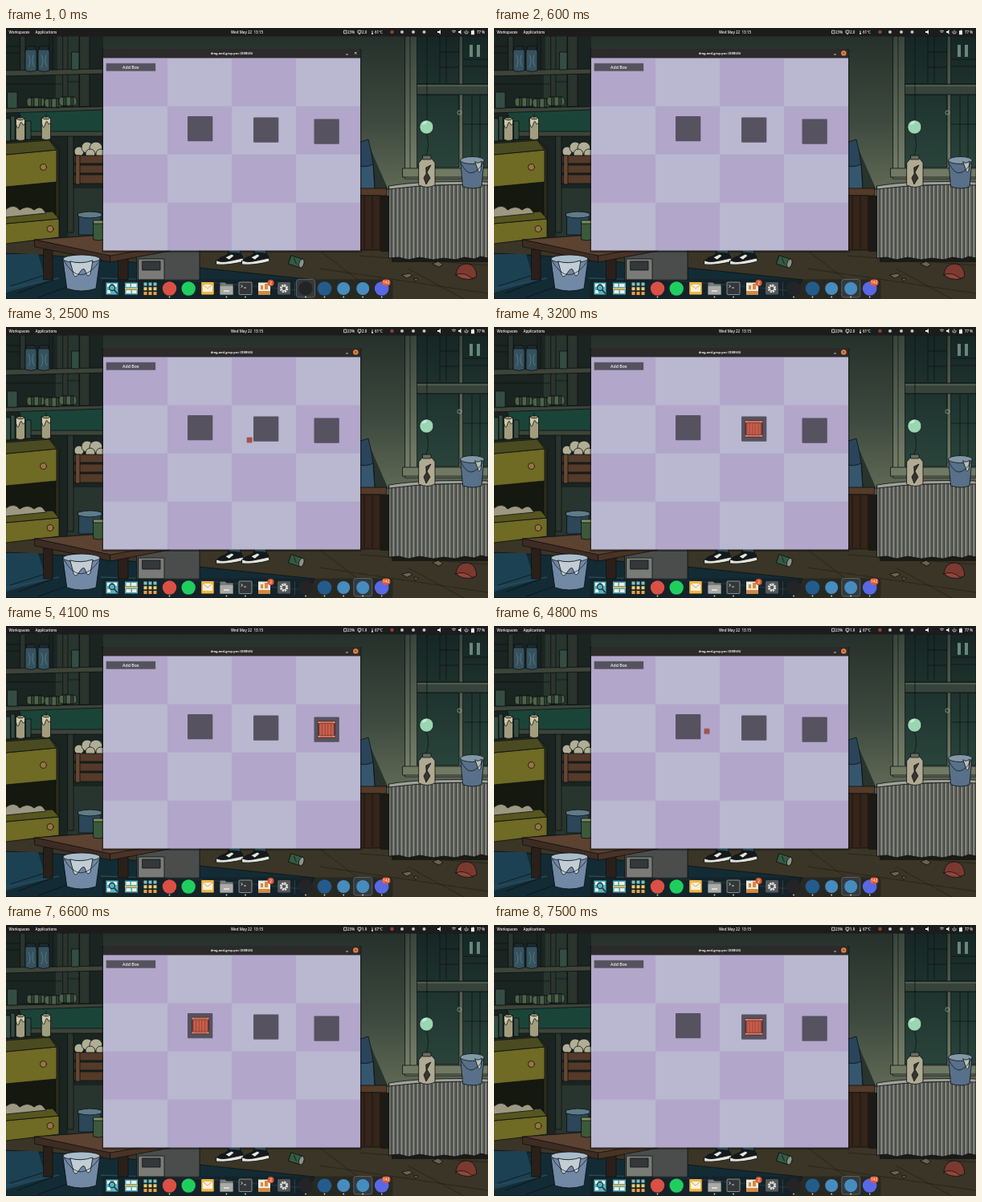
An HTML page that plays this animation: 600 by 338 pixels, repeating every 8 s.

```html
<!DOCTYPE html>
<html lang="en">
<head>
<meta charset="utf-8">
<title>Drag and drop demo</title>
<style>
html, body { margin: 0; width: 100%; height: 100%; overflow: hidden; background: #1b1b1b }
svg { display: block; width: 100vw; height: 100vh }
text { font-family: "Open Sans", "Noto Sans", sans-serif; font-weight: 600; fill: #f1f1f1 }
.bar text { font-size: 4.5px }
.ink { stroke: #0c1113; stroke-width: .8; stroke-linejoin: round; stroke-linecap: round }
.line { fill: none; stroke: #0c1113; stroke-width: .7 }
.step { animation: 8s step-end infinite }
#crate { animation-name: crate }
#held { animation-name: held }
#drag { animation: drag 8s linear infinite }
#edge { animation-name: edge }
.before { animation-name: before }
.after { animation-name: after }
.cool { animation-name: cool }
.warm { animation-name: warm }

@keyframes crate {
  0%, 31.2%, 43.7%, 54.95%, 88.7% { opacity: 0; transform: translate(242px, 125.5px) }
  20%, 66.2% { opacity: 1; transform: translate(242px, 125.5px) }
  40%, 93.7% { opacity: 1; transform: translate(323.5px, 127px) }
  50% { opacity: 1; transform: translate(399px, 129px) }
  100% { opacity: 0 }
}
@keyframes held {
  0%, 40%, 50%, 66.2%, 93.7%, 100% { opacity: 0 }
  31.2%, 43.7%, 54.95%, 88.7% { opacity: 1 }
}
@keyframes drag {
  0%, 31.25% { transform: translate(303px, 141px) }
  38.75%, 43.75% { transform: translate(323.5px, 128px) }
  50%, 55% { transform: translate(399px, 129px) }
  60% { transform: translate(265px, 131.3px) }
  65%, 88.75% { transform: translate(242px, 126px) }
  93.75%, 100% { transform: translate(323.5px, 127px) }
}
@keyframes edge {
  0%, 20%, 82.5%, 100% { stroke: #aaa7b4; fill: #55515f }
  16.25% { stroke: #6f6b79; fill: #504d59 }
  76.2% { stroke: #bc9a92; fill: #5c5864 }
}
@keyframes before { 0% { opacity: 1 } 3.75%, 100% { opacity: 0 } }
@keyframes after { 0% { opacity: 0 } 3.75%, 100% { opacity: 1 } }
@keyframes cool { 0% { opacity: 1 } 45%, 100% { opacity: 0 } }
@keyframes warm { 0% { opacity: 0 } 45%, 100% { opacity: 1 } }
</style>
</head>
<body>
<svg viewBox="0 0 600 338" preserveAspectRatio="none">
<defs>
  <linearGradient id="wall" x2="0" y2="1">
    <stop stop-color="#232e29"/><stop offset=".35" stop-color="#3e4a3f"/><stop offset=".65" stop-color="#66705a"/><stop offset="1" stop-color="#4c5243"/>
  </linearGradient>
  <linearGradient id="frame" x2="0" y2="1">
    <stop stop-color="#38443b"/><stop offset="1" stop-color="#78816a"/>
  </linearGradient>
  <linearGradient id="glass" x2="0" y2="1">
    <stop stop-color="#162624"/><stop offset="1" stop-color="#29443b"/>
  </linearGradient>
  <pattern id="ribs" width="5" height="130" patternUnits="userSpaceOnUse">
    <path fill="#85867e" d="M0 0h5v130h-5z"/><path fill="#5a5c58" d="M3.2 0h1.8v130h-1.8z"/><path class="line" d="M.6 0v130"/>
  </pattern>
  <pattern id="checker" x="121" y="37.5" width="160" height="120.2" patternUnits="userSpaceOnUse">
    <path fill="#bab7d1" d="M0 0h160v121H0z"/><path fill="#b2a6ca" d="M0 0h80v60.1H0zM80 60.1h80v60.1H80z"/>
  </pattern>
  <g id="jar" class="ink">
    <path fill="#35525e" d="M-6 -12h12l1 4v23q-7 3 -14 0v-23z"/><path fill="#1d2b30" d="M-5.5 -15h11v4h-11z"/>
    <path fill="none" stroke="#607f8a" d="M-3 -4q4 8 0 15M3 -4q-3 8 1 14"/>
  </g>
  <g id="candle" class="ink">
    <path fill="#a39d7f" d="M-5.5 -13q5.5 -3 11 0v26q-5 3 -11 0z"/><path fill="#cfc9a8" d="M-5.5 -13q5.5 4 11 0v6q-2 4 -3.5 0t-3.5 3t-4 -2z"/>
    <path class="line" d="M0 -13v-5"/>
  </g>
  <g id="roll" class="ink">
    <rect x="-11" y="-5" width="22" height="11" rx="4" fill="#4f6248"/><path fill="#2d4136" d="M-5 -5h3v11h-3zM4 -5h3v11h-3z"/>
  </g>
  <g id="shoe" class="ink">
    <path fill="#467f8a" d="M-2 -13h14l1 8h-14z"/><path fill="#15191d" d="M-2 -7l15 1q4 4 3 10q-17 4 -32 3q-2 -5 5 -8q7 -2 9 -6z"/>
    <path fill="#e5e6dc" d="M-17 3q6 3 14 1q10 -2 19 -4l1 4q-17 5 -34 4zM-6 -1l8 -4 3 2 -6 5z"/>
  </g>
</defs>

<!-- room -->
<path fill="url(#wall)" d="M0 0h600v338H0z"/>
<path fill="#3a3526" d="M0 266h600v72H0z"/>
<path class="line" opacity=".6" d="M440 266h160M440 284l160 12M390 300l210 31M380 270l90 68M500 300l70 38"/>
<path fill="#132b34" class="ink" d="M0 281L60 284 240 299 384 314 372 338H0z"/>
<path fill="#1c4152" d="M0 282h40l10 34 -50 14z"/>
<path fill="none" stroke="#28495a" stroke-width="1.5" d="M0 325L66 312M118 312L240 316 372 328"/>
<path class="line" d="M5 322l47 -15M14 331l45 -17M40 336l50 -18"/>

<!-- shelves -->
<path fill="#1a2421" d="M0 10h121v256H0z"/>
<path fill="#28352e" d="M62 10h28v88H62zM77 200h44v60H77z"/>
<path fill="#1b4439" class="ink" d="M17 99h104v31H17z"/>
<g fill="#2b342d" class="ink">
  <path d="M92 10h12v88H92zM71 10h6v88h-6zM77 130h7v125h-7zM18 10h6v44h-6z"/>
  <path fill="#3d4438" d="M0 53l121 -2v6L0 60zM0 100l121 -2v4L0 106zM17 129h104v6H17z"/>
</g>
<path class="line" d="M0 23h18M0 31h18M54 10v43M58 10v43M63 10v43M0 70h70M77 67h15"/>
<path class="ink" fill="#344d42" d="M82 30h9v22h-9zM2 80h12v20H2zM0 113h6v28H0zM6 110h5v30H6zM25 116h6v23h-6z"/>
<use href="#jar" x="31" y="38"/><use href="#jar" x="47" y="38"/>
<use href="#roll" x="37" y="92"/><use href="#roll" x="59" y="93"/><use href="#roll" x="77" y="91"/>
<g class="ink" fill="#b0ae95">
  <circle cx="91" cy="154" r="6"/><circle cx="101" cy="149" r="7"/><circle cx="112" cy="150" r="8"/><circle cx="105" cy="157" r="6"/><circle cx="118" cy="157" r="6"/>
  <path fill="#543a28" d="M85 159h37v10H85zM85 171h37v10H85zM85 183h37v11H85z"/><path fill="#664733" d="M87 159h5v36h-5z"/>
</g>

<!-- drawers -->
<g class="ink">
  <path fill="#2b2f1b" d="M0 142l54 -4 12 14v95L0 264z"/>
  <path fill="#15180f" d="M0 195l62 -4v49L0 244z"/>
  <path fill="#6f6a24" d="M0 158l63 -6v40L0 198z"/><path fill="#4a4b20" d="M0 144l54 -4 9 12L0 158z"/>
  <path fill="#6f6a24" d="M0 244l66 -6v23L0 269z"/><path fill="#57561f" d="M0 232l58 -3 8 9L0 244z"/>
  <path fill="#9c9881" d="M0 226q10 -8 17 1q10 -7 18 0q6 -5 10 -2l5 6L0 236z"/>
  <circle cx="46.5" cy="173.5" r="4" fill="#9a7443"/><circle cx="55" cy="250.5" r="4" fill="#9a7443"/>
</g>
<use href="#candle" x="18" y="126"/><use href="#candle" x="50" y="125"/>

<!-- table -->
<g class="ink">
  <path fill="#4b4d4d" d="M163 276h78v39h-78z"/><path fill="#7a7b76" d="M165 288h32v26h-32z"/><path fill="#34383a" d="M170 291h22v11h-22z"/>
  <path fill="#2b2019" d="M47 276h11v38H47zM140 286h12v28h-12z"/>
  <path fill="#5c4231" d="M36 264l84 -6 84 14 -74 13z"/><path fill="#3e2c22" d="M36 264l94 20v8l-94 -19z"/><path fill="#4a3326" d="M130 284l74 -13v7l-74 14z"/>
  <path fill="#2b4759" d="M91 234h27v24H91z"/><path fill="#5f7b88" d="M90 231q15 -4 29 0v4q-15 4 -29 0z"/>
  <path fill="#3c5a3a" d="M109 242h13v22q-7 2 -13 0z"/><path fill="#7d8f5b" d="M109 240h13v4h-13z"/>
  <path fill="#7189a5" d="M71 288h46l-5 37q-18 6 -36 0z"/><ellipse cx="94" cy="288" rx="23" ry="5" fill="#a9bccb"/>
  <path fill="#c3ced4" d="M80 291q12 4 28 -1l-3 17q-4 5 -6 -3t-8 2t-8 -3z"/><path class="line" d="M72 290q20 36 45 0"/>
</g>
<use href="#shoe" x="279" y="287"/><use href="#shoe" x="311" y="287"/>
<g class="ink" transform="rotate(18 361 292)">
  <path fill="#345b43" d="M353 286h15v11h-15z"/><ellipse cx="368" cy="291.5" rx="3" ry="5.5" fill="#8b9288"/><path class="line" d="M357 288l5 6"/>
</g>

<!-- window wall -->
<path fill="url(#frame)" class="ink" d="M497 10h103v178H497z"/>
<path class="line" d="M503 10v165"/>
<path fill="url(#glass)" class="ink" d="M512 10h52v60h-52zM569 10h31v60h-31zM512 83h52v91h-52zM569 83h31v91h-31z"/>
<path fill="#35433a" class="ink" d="M512 70h88v13h-88z"/><path fill="none" stroke="#68735f" d="M512 72h88"/>
<path fill="#707a63" class="ink" d="M494 175h106v11H494z"/>
<path class="line" d="M540 10v58M548 10v58M540 30h24M540 49h24M569 39h31M569 48h31M580 84v90M590 84v90M569 120h31M564 84v18M524 10v104"/>
<path fill="#66877a" d="M577 21h4v15h-4zM586 21h4v15h-4z"/>
<circle cx="523.5" cy="123.5" r="8.7" fill="#9ad6b2" class="ink"/><path fill="#cdecd3" d="M518 121q1 -5 6 -5l-1 3z"/>
<circle cx="564.5" cy="105.5" r="2.5" fill="none" stroke="#9da58a" stroke-width=".8"/>
<path class="line" d="M523.5 132q5 17 -2 30"/>

<!-- chair and metal chest -->
<g class="ink">
  <path fill="#28342d" stroke="none" d="M450 142q12 28 26 60h-30z"/>
  <path fill="#2a455b" d="M438 143l13 -4q8 29 8 66h-21z"/><path fill="#36566e" d="M438 171q9 4 19 -1l2 31h-21z"/>
  <path fill="#553a28" d="M438 200h36v9h-36z"/><path fill="#35241a" d="M438 209h28v68h-28z"/><path class="line" d="M446 210v65M456 210v65"/>
  <path fill="#1b1a14" stroke="none" d="M466 209h12v70h-12zM480 284h120v8H480z"/>
  <path fill="url(#ribs)" d="M477 198l123 -4v93l-9 -2 -8 3 -12 -2 -12 3 -14 -2 -13 2 -17 -3 -14 3 -12 -3 -12 1z"/>
  <path fill="#a0a198" d="M477 197q40 -7 123 -5v4q-60 -3 -123 5z"/>
  <path fill="#b1aa92" d="M514 168l5 -6h10l5 6v28q-10 5 -20 0z"/><path fill="#696b62" d="M519 159h10v5h-10z"/>
  <path fill="#39342f" d="M523 174l6 -3 -5 9 4 7 -5 8 -3 -8 3 -5z"/>
  <path fill="#587089" d="M566 165h29l-3 33q-11 4 -23 0z"/><ellipse cx="580.5" cy="165" rx="15" ry="4.5" fill="#8198a8"/>
  <path fill="#b8c0b6" d="M584 167q4 3 8 -1l-1 12q-3 4 -4 -2z"/><path class="line" d="M566 168q12 26 28 0"/>
  <path fill="#7c3930" d="M560 308q1 -14 14 -14q11 1 12 16q-8 5 -15 1z"/><path fill="#934739" d="M560 308q10 -5 21 5q-13 2 -21 -5z"/>
  <path fill="#6d624a" d="M531 294l7 -3 6 4 -5 3zM493 308l9 -2 4 3 -7 3zM508 312l5 1 -3 3z"/>
</g>

<!-- top bar -->
<g class="bar">
  <path fill="#1c1c1c" d="M0 0h600v10.5H0z"/>
  <text x="3.5" y="6.7">Workspaces</text><text x="36.5" y="6.7">Applications</text>
  <text x="300" y="6.7" text-anchor="middle" xml:space="preserve">Wed May 22  13:15</text>
  <text x="425" y="6.7">23%</text>
  <g class="step cool"><text x="443" y="6.7">2.0</text><text x="459" y="6.7">61°C</text></g>
  <g class="step warm"><text x="443" y="6.7">1.9</text><text x="459" y="6.7">67°C</text></g>
  <g fill="none" stroke="#e6e6e6" stroke-width=".8">
    <path d="M420.5 3.2h3.5v3.6h-3.5zM438 3.2h4v3h-4zM439 7.5h2M456 3v4M575 4v2q0 1 -2 1t-2 -1v-2M573 2.5v3M555 4q2.5 -2 5 0M556 5.4q1.5 -1 3 0"/>
  </g>
  <circle cx="456" cy="7" r="1" fill="#eee"/>
  <circle cx="480.5" cy="5" r="2.3" fill="#8e4138"/>
  <g fill="#c4c4c4"><circle cx="493" cy="5" r="2"/><circle cx="507" cy="5" r="2"/><circle cx="520.5" cy="5" r="2"/></g>
  <path fill="#eee" d="M537 4h2l2 -2v6l-2 -2h-2zM563 4h1.5l2 -2v6l-2 -2H563zM579 3.2h2v-.8h1v.8h1v5h-4z"/>
  <text x="586" y="6.7">77 %</text>
</g>

<!-- app window -->
<path fill="#0f1211" opacity=".5" d="M119.5 26h323v254h-323z"/>
<path fill="#2c2a2a" d="M121 38V29q0 -3 3 -3h314q3 0 3 3v9z"/>
<text x="281" y="33.2" font-size="3.9" text-anchor="middle" style="font-weight:700">drag-and-grop-poc (DEBUG)</text>
<path stroke="#e9e9e9" stroke-width=".8" d="M423 33h3"/>
<circle class="step after" cx="435.3" cy="31.4" r="3.2" fill="#ed8540"/>
<path class="step before" stroke="#eee" stroke-width=".8" d="M434 30l2.6 2.6M436.6 30l-2.6 2.6"/>
<path class="step after" stroke="#48301f" stroke-width=".7" d="M434 30.1l2.6 2.6M436.6 30.1l-2.6 2.6"/>
<path fill="url(#checker)" d="M121 37.5h320v240H121z"/>
<rect id="edge" class="step" x="124.3" y="43.7" width="62.2" height="10.4" rx="1" stroke-width=".8"/>
<text x="155.3" y="50.8" font-size="5.2" text-anchor="middle">Add Box</text>
<g fill="#565260">
  <rect x="226" y="110" width="31.3" height="31.3" rx="1"/><rect x="308" y="111.4" width="31.3" height="31.3" rx="1"/><rect x="383.5" y="113.4" width="31.3" height="31.3" rx="1"/>
</g>
<g id="crate" class="step">
  <path fill="#823c36" stroke="#33282e" stroke-width=".8" d="M-10.5 -10.5h21v21h-21z"/>
  <path fill="none" stroke="#c95f4b" stroke-width="2.9" d="M-7.2 -8v16M-3.6 -8v16M0 -8v16M3.6 -8v16M7.2 -8v16"/>
  <path fill="#cf7a62" stroke="#54292a" stroke-width=".6" d="M-11 -10.2h22v2.8h-22zM-11 7.4h22v2.8h-22z"/>
  <path fill="#e0a083" d="M-10 -9.6h1.6v1.6h-1.6zM8.4 -9.6h1.6v1.6h-1.6zM-10 8h1.6v1.6h-1.6zM8.4 8h1.6v1.6h-1.6z"/>
</g>
<g id="held" class="step"><g id="drag">
  <path fill="#ba5748" stroke="#72504f" stroke-width=".7" d="M-3 -3h6v6h-6z"/><path stroke="#7e3c35" stroke-width=".5" d="M-1 -2v4M1 -2v4"/>
</g></g>

<!-- dock -->
<rect x="119.5" y="313.5" width="362" height="26" rx="4" fill="#161c1e" opacity=".5"/>
<path stroke="#4a5153" stroke-width=".6" d="M359.5 317v17"/>
<g fill="#33393c" stroke="#7b8082" stroke-width=".6">
  <rect class="step before" x="361.5" y="313.5" width="23" height="22.5" rx="3"/>
  <rect class="step after" x="432.8" y="313.5" width="23" height="22.5" rx="3"/>
</g>
<g>
  <path fill="#55b6c2" d="M124.5 317.5h15v15h-15z"/><path fill="#e8f0ed" d="M126 319h4v4h-4zM134 319h4v4h-4zM126 327h4v4h-4z"/>
  <circle cx="132" cy="324" r="3.5" fill="#5cb3be" stroke="#25383f" stroke-width="1.3"/><path stroke="#25383f" stroke-width="1.8" d="M134.5 326.5l4.5 5"/>
  <path fill="#4aa7b4" d="M148 317.5h16v15h-16z"/><path fill="#f0eee4" d="M149.5 319h5v4h-5zM156 319h6.5v4H156zM149.5 327h6v4h-6zM157 327h5.5v4H157z"/><path fill="#edb452" d="M148 324h16v2h-16z"/>
  <g fill="none" stroke-width="4" stroke-dasharray="4 2"><path stroke="#79c5c6" d="M171.5 319.5h16"/><path stroke="#f1cc72" d="M171.5 325.3h16"/><path stroke="#efa145" d="M171.5 331h16"/></g>
  <circle cx="203.5" cy="325" r="8.7" fill="#db5044"/>
  <circle cx="227.2" cy="325" r="8.7" fill="#20ce60"/>
  <rect x="243.2" y="317" width="15.5" height="15.5" rx="1" fill="#efb744"/><path fill="#f8f0dc" d="M245 320h12v9h-12z"/><path fill="none" stroke="#c8963a" stroke-width=".8" d="M245 320l6 5 6 -5"/>
  <path fill="#777b7a" d="M266.5 317.5h6l2 2h8v13h-16z"/><path fill="#a9aaa5" d="M266.5 322h16v10.5h-16z"/><path fill="#dadad2" d="M271 327h7v2h-7z"/>
  <rect x="290" y="317" width="16" height="15.5" rx="1" fill="#343739" stroke="#a4a7a5" stroke-width=".8"/><path fill="none" stroke="#f1f1f1" stroke-width=".8" d="M292.5 320.5l2 1.5 -2 1.5M296 324h3"/>
  <path fill="#eceae0" d="M314 317.5h15v15h-15z"/><path fill="#d9893e" d="M314 328h15v4.5h-15zM317 321h3v5h-3zM322 319h4v7h-4z"/>
  <rect x="338" y="317" width="16" height="15.5" rx="1.5" fill="#54585a"/><circle cx="346" cy="324.8" r="4" fill="none" stroke="#e3e4df" stroke-width="2.4" stroke-dasharray="2.2 .9"/><circle cx="346" cy="324.8" r="2.8" fill="none" stroke="#e3e4df"/>
  <circle cx="373" cy="324.8" r="8.8" fill="#242427"/>
  <circle cx="396.5" cy="325" r="8.8" fill="#245b8d"/>
  <circle cx="420.2" cy="325" r="8" fill="#478cbf"/><circle cx="444.2" cy="325" r="8" fill="#478cbf"/>
  <circle cx="467.7" cy="325" r="8.8" fill="#5968e4"/>
</g>
<g fill="#e0592f"><circle cx="329.5" cy="318" r="4"/><rect x="468" y="313.5" width="10.5" height="8" rx="4"/></g>
<g font-size="4.7" text-anchor="middle"><text x="329.5" y="319.8">2</text><text x="473.2" y="319.2">142</text></g>
<path fill="none" stroke="#e6d3b8" stroke-width="1.8" stroke-linecap="round" d="M203.5 335.5h.01M274.5 335.5h.01M298 335.5h.01M373 335.5h.01M396.5 335.5h.01M420.2 335.5h.01M444.2 335.5h.01M467.7 335.5h.01"/>
</svg>
</body>
</html>
```
